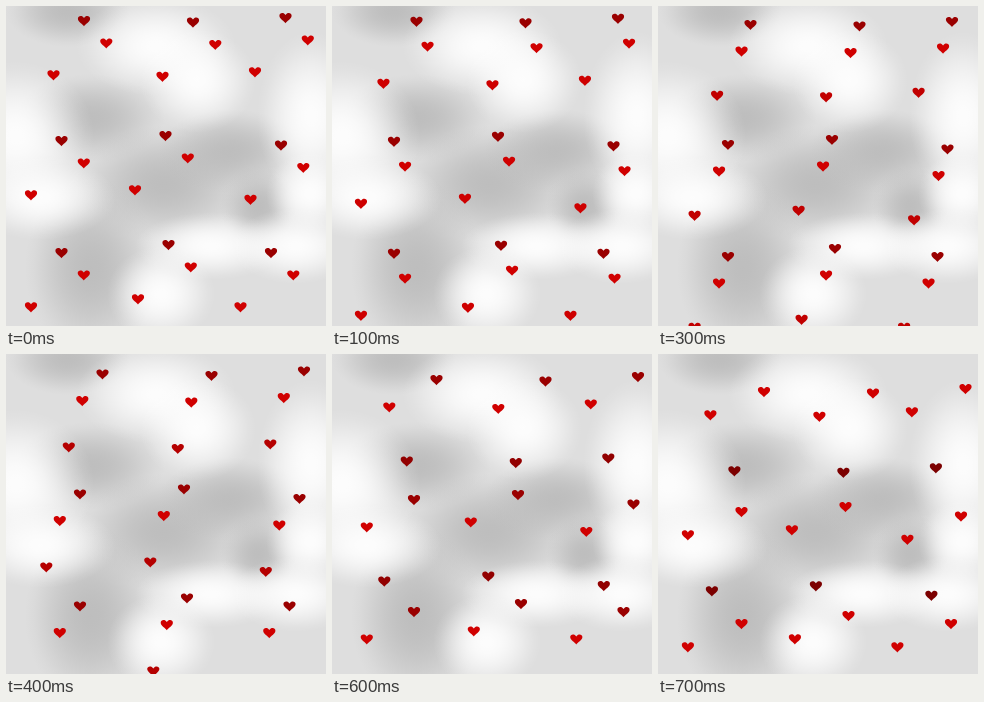
An HTML page with a canvas for the animation above (0.8 s loop, 320 by 320 pixels).

```html
<!DOCTYPE html>
<html lang="en">
<head>
<meta charset="utf-8">
<title>Falling hearts</title>
<style>
html, body { margin: 0; width: 100%; height: 100%; overflow: hidden; background: #dedede; }
canvas { display: block; width: 320px; height: 320px; }
</style>
</head>
<body>
<canvas id="stage" width="320" height="320"></canvas>
<script>
const ctx = document.getElementById('stage').getContext('2d');
const STEP = 100, STEPS = 8, HEARTS = 3;

// Soft clouds: x, y, radius x, radius y
const dark = [
  [62, 5, 62, 36], [85, 112, 74, 44], [158, 178, 88, 58],
  [225, 145, 72, 42], [252, 200, 38, 40], [85, 262, 66, 90]
];
const light = [
  [150, 40, 80, 50], [10, 130, 78, 75], [35, 192, 75, 42],
  [192, 75, 58, 52], [305, 110, 54, 85], [304, 188, 44, 42],
  [205, 240, 76, 34], [155, 288, 54, 48], [290, 240, 65, 38]
];

// Start of each falling path
const starts = [
  [78, 15], [187, 16.5], [279.5, 12],
  [55.5, 135], [159.5, 130], [275, 139.5],
  [55.5, 247], [162.5, 239], [265, 247]
];

// Zigzag fall shared by all hearts: step, x, y
const path = [
  [0, 0, 0], [1, 6.5, .7], [4, 18.5, 5.4], [6, 26.5, 11], [7, 28, 23],
  [8, 22.3, 22.4], [10, 12.8, 28.9], [12, -1.7, 32], [14, -20.7, 38.4],
  [16, -30.5, 54.2], [18, -22.6, 71.2], [20, -15.2, 78.4],
  [22, -3.2, 92.5], [24, 0, 112]
];

const heart = new Path2D(
  'M0 5.2 C-1 3.2 -6.1 .8 -6.1 -2.3 C-6.1 -5.5 -1.6 -5.9 0 -2.9 ' +
  'C1.6 -5.9 6.1 -5.5 6.1 -2.3 C6.1 .8 1 3.2 0 5.2 Z');

function place(step) {
  const i = path.findIndex(p => p[0] > step);
  const [s0, x0, y0] = path[i - 1], [s1, x1, y1] = path[i];
  const k = (step - s0) / (s1 - s0);
  return [x0 + (x1 - x0) * k, y0 + (y1 - y0) * k];
}

// Dark on the first swing, bright on the second, fading on the third
function redAt(step) {
  if (step < 7) return 154;
  const fade = Math.max(0, (step - 16) / 7);
  return 208 - 84 * fade * fade;
}

function addCloud(c, [x, y, rx, ry], grey, alpha) {
  const soft = c.createRadialGradient(0, 0, 0, 0, 0, 1);
  for (let r = 0; r <= 1; r += .125) {
    soft.addColorStop(r, `rgba(${grey},${grey},${grey},${alpha * (1 - r * r) ** 1.5})`);
  }
  c.save();
  c.translate(x, y);
  c.scale(rx, ry);
  c.fillStyle = soft;
  c.fillRect(-1, -1, 2, 2);
  c.restore();
}

function paintSky() {
  const canvas = document.createElement('canvas');
  canvas.width = canvas.height = 320;
  const c = canvas.getContext('2d');
  c.fillStyle = '#dedede';
  c.fillRect(0, 0, 320, 320);
  dark.forEach(cloud => addCloud(c, cloud, 184, .85));
  light.forEach(cloud => addCloud(c, cloud, 255, .92));
  return canvas;
}

const sky = paintSky();

function draw(time) {
  const step = Math.floor(time / STEP) % STEPS;
  ctx.drawImage(sky, 0, 0);
  for (let n = 0; n < HEARTS; n++) {
    const phase = step + n * STEPS;
    const [dx, dy] = place(phase);
    ctx.fillStyle = `rgb(${redAt(phase)},0,0)`;
    for (const [x, y] of starts) {
      ctx.save();
      ctx.translate(x + dx, y + dy);
      ctx.fill(heart);
      ctx.restore();
    }
  }
}

const start = performance.now();
function tick() {
  draw(performance.now() - start);
  requestAnimationFrame(tick);
}
tick();
</script>
</body>
</html>
```
